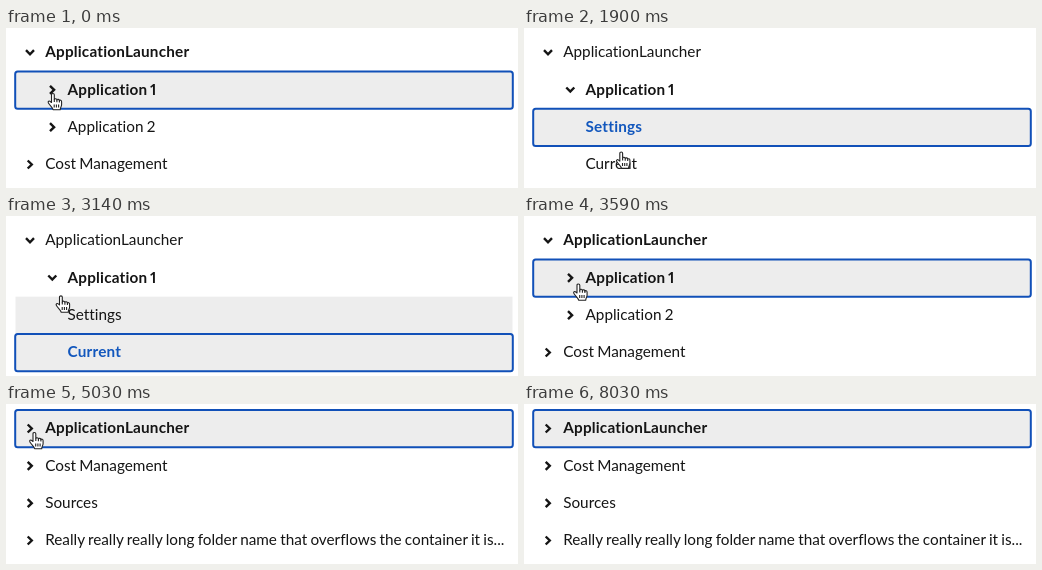
Write an HTML page that moves like this. It is 512 px wide and 160 px high and loops after 8440 ms.

```html
<!DOCTYPE html>
<html lang="en">
<head>
<meta charset="utf-8">
<title>Tree view</title>
<style>
html, body { margin: 0; width: 100%; height: 100%; overflow: hidden; background: #fff; }
svg { display: block; width: 512px; height: 160px; }
text {
  font: 15.3px Lato, sans-serif; fill: #151515;
  font-variant-ligatures: none; font-variant-numeric: proportional-nums; word-spacing: -.7px;
}
.bold { font-weight: 700; letter-spacing: .2px; word-spacing: -1.4px; }
.leaf { fill: #1257bd; }
.ring { fill: #ededed; stroke: #1150b8; stroke-width: 2; }
.hover { fill: #ededed; }
.chevron { fill: none; stroke: #151515; stroke-width: 2.4; }
#hand path { fill: #fff; stroke: #222; stroke-width: 1.1; stroke-linejoin: round; }
</style>
</head>
<body>
<svg viewBox="0 0 512 160">
  <g id="rows"></g>
  <g id="hand">
    <path d="M-1.5 9V1.2C-1.5-.4 1.3-.4 1.3 1.2V6C1.6 4.9 3.8 5 3.9 6.4C4.4 5.4 6.3 5.7 6.4 7.1C7 6.3 8.6 6.7 8.6 8.2V11C8.6 13 7.4 13.7 7.2 16.3H.1C-.1 14.2-2.6 12.8-4.6 9.5C-5.5 8-3.8 7-2.7 8Z"/>
    <path d="M1.3 6V8.5M3.9 6.4V8.8M6.4 7.1V9M1.2 11V14M3.4 11V14M5.6 11V14"/>
  </g>
</svg>
<script>
const LOOP = 8440, PITCH = 37.33, TOP = 6, DELAY = 70;

const node = (label, level, open) => ({ label, level, open });
const leaf = label => ({ label, level: 2, isLeaf: true });
const launcher = node("ApplicationLauncher", 0, true);
const cost = node("Cost Management", 0);
const folded = [launcher, node("Application 1", 1), node("Application 2", 1), cost];
const unfolded = [launcher, node("Application 1", 1, true), leaf("Settings"), leaf("Current")];
const roots = [node("ApplicationLauncher", 0), cost, node("Sources", 0),
  node("Really really really long folder name that overflows the container it is...", 0)];

// A press moves the focus ring at once; its release, DELAY later, updates the tree.
const clicks = [
  { at: -DELAY, row: 1, list: folded },
  { at: 380, row: 1, list: unfolded },
  { at: 1380, row: 2, list: unfolded },
  { at: 2280, row: 3, list: unfolded },
  { at: 3520, row: 1, list: folded },
  { at: 4790, row: 0, list: roots }
];
const start = { x: 47, y: 65.5 };
const moves = [
  { from: 30, to: 210, x: 46.5, y: 60.5 },
  { from: 1000, to: 1240, x: 75, y: 90 },
  { from: 1380, to: 1590, x: 90, y: 97 },
  { from: 1760, to: 2030, x: 100, y: 134 },
  { from: 3000, to: 3140, x: 55, y: 80 },
  { from: 3140, to: 3380, x: 54.5, y: 68 },
  { from: 4480, to: 4550, x: 28.5, y: 28.5 },
  { from: 7170, to: 7410, x: 80, y: -19 }
];

const clamp = v => Math.min(1, Math.max(0, v));
const lastClick = t => clicks.findLast(c => c.at <= t);

function pointer(t) {
  return moves.reduce((p, m) => {
    const k = Math.sin(clamp((t - m.from) / (m.to - m.from)) * Math.PI / 2);
    return { x: p.x + (m.x - p.x) * k, y: p.y + (m.y - p.y) * k };
  }, start);
}

function rowMarkup({ label, level, isLeaf }, i, { bold, focused, hovered, turn }) {
  const y = TOP + i * PITCH, mid = y + 18.5;
  const x = 24 + (isLeaf ? level - 1 : level) * 22.3;
  let out = "";
  if (focused) out += `<rect class="ring" x="9.2" y="${y + .1}" width="497.6" height="37.2" rx="2.5"/>`;
  else if (hovered) out += `<rect class="hover" x="9.5" y="${y}" width="497" height="${PITCH}"/>`;
  if (!isLeaf) {
    out += `<path class="chevron" d="M-2.3-4L1.8 0L-2.3 4" transform="translate(${x} ${mid}) rotate(${turn})"/>`;
  }
  const style = bold ? (isLeaf ? "bold leaf" : "bold") : "";
  return out + `<text class="${style}" x="${x + 15.2}" y="${mid + 4.9}">${label}</text>`;
}

const rows = document.getElementById("rows"), hand = document.getElementById("hand");
let shown = "";

function draw(now) {
  const t = now % LOOP;
  const focus = lastClick(t).row;
  const { at, row, list } = lastClick(t - DELAY);
  const parent = list.findLastIndex((n, i) => i < row && n.level < list[row].level);
  // Hover trails the pointer slightly.
  const hover = Math.floor((pointer(t - DELAY).y - TOP) / PITCH);
  const opening = 90 * clamp((t - at - DELAY) / DELAY);
  // The focused row is painted last so its ring stays whole.
  const order = [0, 1, 2, 3].sort((a, b) => (a === focus) - (b === focus));
  const markup = order.map(i => rowMarkup(list[i], i, {
    bold: i === row || i === parent,
    focused: i === focus,
    hovered: i === hover,
    turn: list[i].open ? (i === row ? opening : 90) : 0
  })).join("");
  if (markup !== shown) rows.innerHTML = shown = markup;
  const { x, y } = pointer(t);
  hand.setAttribute("transform", `translate(${x} ${y})`);
  requestAnimationFrame(draw);
}
requestAnimationFrame(draw);
</script>
</body>
</html>
```
